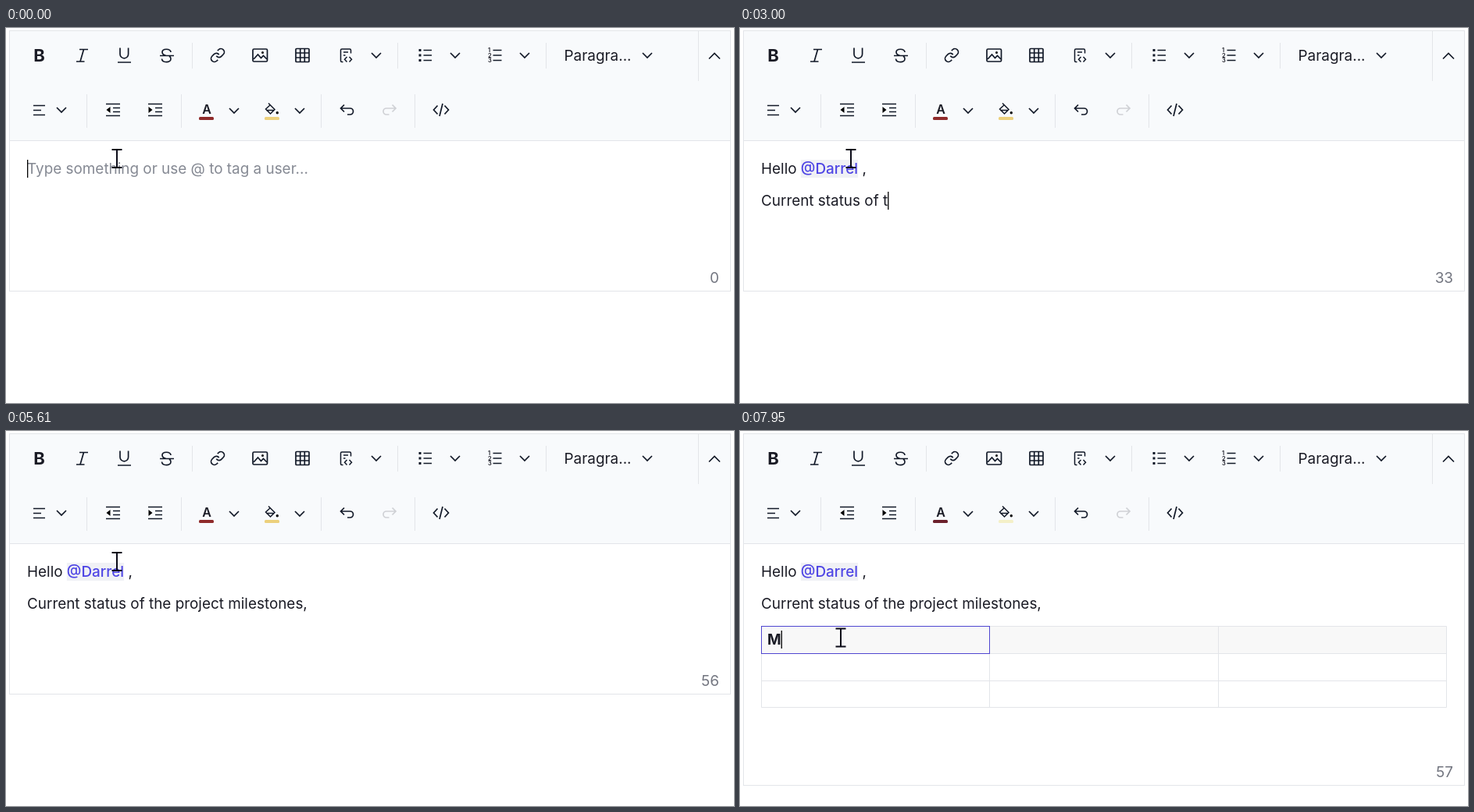
An HTML page that plays this animation: 932 px wide and 481 px high, repeating every 8 s.

```html
<!DOCTYPE html>
<html lang="en">
<head>
<meta charset="utf-8">
<title>Rich text editor</title>
<style>
  html, body { margin: 0; width: 100%; height: 100%; overflow: hidden; background: #fff; }
  svg { display: block; }
  text { font: 400 18.9px Inter, sans-serif; fill: #1a1b25; white-space: pre; }
  .mid { font-weight: 500; }
  .semi { font-weight: 600; }
  .note { font-size: 14.85px; }
  .label { font-size: 16.2px; font-weight: 500; }
  .line { fill: none; stroke: #e3e5e9; }
  .icon { fill: none; stroke: #111827; stroke-width: 1.7; }
  .soft { fill: none; stroke: #6b7280; stroke-width: 1.6; }
  .field { fill: #fff; stroke: #d1d5db; }
  .scroll { fill: #8b8b8b; stroke: #8b8b8b; stroke-linejoin: round; }
  .pop { filter: drop-shadow(0 2px 4px rgba(0, 0, 0, .28)); }
  .modal { filter: drop-shadow(0 6px 8px rgba(0, 0, 0, .2)); }
</style>
</head>
<body>
<svg id="stage" width="932" height="481" viewBox="0 0 932 481"></svg>
<script>
const LOOP = 8000;
const USER = 'Darrel';
const GREETING = 'Hello @';
const SENTENCE = 'Current status of the project milestones,';

const path = (d, cls = 'icon', extra = '') => `<path class="${cls}" d="${d}" ${extra}/>`;
const label = (x, y, s, cls = '', extra = '') => `<text x="${x}" y="${y}" class="${cls}" ${extra}>${s}</text>`;
const box = (x, y, w, h, extra = '') => `<rect x="${x}" y="${y}" width="${w}" height="${h}" ${extra}/>`;
const chevron = (x, y, up, cls) => path(`M${x - 6} ${y + (up ? 3 : -3)}l6 ${up ? -6 : 6}l6 ${up ? 6 : -6}`, cls);

function toolbar() {
  const link = 'M10 13a5 5 0 0 0 7.54.54l3-3a5 5 0 0 0-7.07-7.07l-1.72 1.71M14 11a5 5 0 0 0-7.54-.54l-3 3a5 5 0 0 0 7.07 7.07l1.71-1.71';
  const rules = [238.5, 501.5, 691.5].map(x => `M${x} 19V52`)
    .concat([103.5, 224.5, 403.5, 523.5].map(x => `M${x} 85V128`)).join('');
  const downs = [[474, 35], [575, 35], [664, 35], [821, 35], [71, 105], [292, 106], [376, 106]];
  return box(5, 4, 922, 140, 'fill="#f8fafc"')
    + path('M5 144.5H927M886.5 4V68' + rules, 'line')
    + downs.map(([x, y]) => chevron(x, y)).join('')
    + path('M900 39.5l7-7l7 7')
    + label(35.2, 43, 'B', '', 'style="font-size:22px;font-weight:700"')
    + path('M94 27.5H105M90 43H100.5M99.5 27.5L95 43')
    + path('M146 25.5V33.5a5.3 5.3 0 0 0 10.6 0V25.5M143 44H160')
    + path('M211 31c-.5-5-11-5-11 0c0 2.5 2 3.7 5 4.5M199.5 39.5c.5 5.5 11.5 5.5 11.5 0c0-1.5-.6-2.7-2-3.5M197 35.5H215')
    + path(link, 'icon', 'transform="translate(260.8 24.8) scale(.85)" style="stroke-width:2"')
    + box(316, 27, 18.5, 16, 'class="icon" rx="1.5"')
    + path('M317 40l5.5-6l4 4.5l3-3l4.5 4.5') + '<circle cx="328.5" cy="31.5" r="1.5"/>'
    + box(371, 26.5, 17, 17, 'class="icon" rx="1"')
    + path('M371 32H388M371 38H388M376.7 26.5V43.5M382.3 26.5V43.5')
    + path('M431.5 43.5H430a1.5 1.5 0 0 1-1.5-1.5V28.5a1.5 1.5 0 0 1 1.5-1.5H440a1.5 1.5 0 0 1 1.5 1.5V32.5M432 31H438M432 35H434.5M436.5 37l-3 3.2l3 3.2M439.5 37l3 3.2l-3 3.2', 'icon', 'style="stroke-width:1.5"')
    + path('M528.5 28.5h3M528.5 35h3M528.5 41.5h3', 'icon', 'style="stroke-width:3"')
    + path('M534.5 28.5H545M534.5 35H545M534.5 41.5H545M623.5 28.5H634.5M623.5 35H634.5M623.5 41.5H634.5')
    + [1, 2, 3].map(n => label(617, 24.5 + n * 6.5, n, 'semi', 'style="font-size:7.5px"')).join('')
    + label(714.5, 42, 'Paragra...')
    + path('M35 99.5H50M35 105.5H45M35 111.5H50')
    + path('M128 97.5H146M137 102.5H146M137 107.5H146M128 112.5H146M182 97.5H200M191 102.5H200M191 107.5H200M182 112.5H200')
    + '<path d="M133.5 101v8l-5-4zM182.5 101v8l5-4z"/>'
    + label(251.3, 110, 'A', 'semi', 'style="font-size:16px"')
    + box(247, 114, 19, 4, 'rx="1.5" id="inkBar"')
    + path('M336 96.5l8 8l-5.5 5.5l-6-6l6-5.5M333 105.5H343', 'icon', 'style="stroke-width:1.5"')
    + '<circle cx="347.3" cy="108.7" r="1.7"/>'
    + box(331, 114, 19, 4, 'rx="1.5" id="fillBar"')
    + path('M433 98.5l-4.5 4.5l4.5 4.5M428.5 103H440.5a4 4 0 0 1 0 8H437')
    + path('M494.5 98.5l4.5 4.5l-4.5 4.5M499 103H487a4 4 0 0 0 0 8H490.5', 'icon', 'style="stroke:#cfd1d5"')
    + path('M552.5 99.5l-5 5.5l5 5.5M561.5 99.5l5 5.5l-5 5.5M559 97l-4 16');
}

const blockItem = (y, icon, title, note) =>
  icon + label(124, y + 27, title, 'mid') + label(124, y + 54.4, note, 'note');
const glyph = (y, s) => label(63, y + 42.5, s, '', 'style="font-size:17.5px;fill:#30323d"');

function blockMenu() {
  return `<g id="blocks" class="pop">${box(27, 275, 405, 300, 'fill="#fff"')}
    ${label(43, 302, 'Basic Block', 'mid')}${box(27, 317, 382, 70, 'fill="#e5e6e7"')}
    ${blockItem(317, glyph(317, 'T'), 'Paragraph', 'Writing with paragraphs.')}
    ${blockItem(387, glyph(387, 'H1'), 'Heading 1', 'Use this for a top level heading or title.')}
    ${blockItem(457, glyph(457, 'H2'), 'Heading 2', '')}
    ${path('M414 291l6.5-9.5l6.5 9.5z', 'scroll')}${box(414, 301, 13, 136, 'rx="6" fill="#8b8b8b"')}</g>
    <g id="tableItem" class="pop">${box(27, 275, 405, 113, 'fill="#fff"')}
    ${label(43, 302, 'Basic Block', 'mid')}${box(27, 317, 405, 70, 'fill="#e5e6e7"')}
    ${blockItem(317, path('M64 345.5h16v15h-16zM64 350.5h16M64 355.5h16M72 345.5v15'), 'Table', 'Insert a table.')}</g>`;
}

function userMenu() {
  const people = [USER, 'Camira', 'Rowena', 'Tobin'];
  const tones = ['#a9b8cc', '#d3b7a3', '#b5c6ae', '#c1b3cf'];
  const rows = people.map((name, i) => {
    const y = 197 + i * 73;
    return (i ? '' : box(78, y, 317, 73, 'fill="#e5e6e7"'))
      + `<circle cx="113" cy="${y + 35}" r="23" fill="${tones[i]}"/>
      <path fill="#667085" d="M99 ${y + 52}c2-17 26-17 28 0a22 22 0 0 1-28 0z"/><circle cx="113" cy="${y + 29}" r="8" fill="#667085"/>`
      + label(150, y + 30, name, 'mid') + label(150, y + 52, name.toLowerCase() + '@mail.example', 'note');
  }).join('');
  return `<clipPath id="userClip">${box(78, 195, 336, 265)}</clipPath>
    <g id="users" class="pop">${box(78, 195, 336, 265, 'fill="#fff"')}<g clip-path="url(#userClip)">${rows}</g>
    ${path('M397.5 210l6.5-9.5l6.5 9.5z', 'scroll')}${box(398, 219, 12, 110, 'rx="6" fill="#8b8b8b"')}</g>`;
}

function numberField(id, y, title) {
  return label(262, y - 13.5, title, 'label')
    + box(258.5, y, 347, 41, `rx="5" class="field" id="${id}Field"`)
    + box(270, y + 9, 11.5, 23, `fill="#1a73d8" id="${id}Mark"`)
    + label(270, y + 26.5, '3', '', `id="${id}"`)
    + chevron(545, y + 19.5, false, 'soft') + chevron(585, y + 19.5, true, 'soft');
}

function dialog() {
  return `<g id="dialog"><g class="modal">${box(237, 3, 391, 327, 'rx="8" fill="#fff"')}</g>
    <path d="M237 266H628V322a8 8 0 0 1-8 8H245a8 8 0 0 1-8-8z" fill="#f8f9fc"/>
    ${label(257.5, 37, 'Insert Table', 'semi', 'style="font-size:21.6px"')}
    ${path('M586 18l13.5 13.5M599.5 18l-13.5 13.5', 'soft')}
    ${numberField('cols', 111.5, 'Number of columns')}${numberField('rows', 202.5, 'Number of rows')}
    ${box(432, 277, 77, 42, 'rx="5" fill="#4f46e5"')}${label(443.5, 304, 'Insert', 'semi', 'style="fill:#fff"')}
    ${box(519.5, 277.5, 86, 41, 'rx="5" class="field"')}${label(530.5, 304, 'Cancel', 'semi', 'style="fill:#374151"')}</g>`;
}

function tableTools() {
  const grid = x => path(`M${x - 8} 208h16v16h-16zM${x - 8} 213.3h16M${x - 8} 218.6h16M${x} 208v16`);
  const spots = [129, 190, 270, 350, 430, 510, 590, 670, 750];
  return `<g id="tools"><g class="pop">${box(104, 188, 724, 54, 'rx="5" fill="#fff"')}</g>
    ${box(108, 194, 42, 42, 'rx="4" fill="#e5e7eb" id="toolHover"')}
    ${spots.map((x, i) => grid(x) + (i ? chevron(x + 32, 216) : '')).join('')}</g>`;
}

const stage = document.getElementById('stage');
stage.innerHTML = toolbar()
  + box(4.5, 3.5, 923, 334, 'class="line" id="frame"')
  + label(27, 187, 'Type something or use @ to tag a user...', '', 'id="hint" style="fill:#858993"')
  + box(78, 169, 73, 23, 'fill="#f0f1f5" id="chip"')
  + '<text x="27" y="187" id="line1"><tspan id="hello"></tspan><tspan id="tag" class="mid" style="fill:#4f46e5"></tspan><tspan id="tail"></tspan></text>'
  + label(27, 228, '', '', 'id="line2"') + label(27, 270, '', '', 'id="line3"')
  + `<g id="table">${box(28, 251, 876, 34, 'fill="#f8f8f8" id="head"')}${path('', 'line', 'id="grid"')}
     ${box(27.5, 250.5, 292, 35, 'fill="none" stroke="#4f46d0"')}${label(35, 274, '', '', 'id="cell" style="font-weight:700"')}
     ${box(898, 314, 14, 14, 'fill="#fff" stroke="#9ca3af" id="handle"')}</g>`
  + label(913, 327, '', '', 'id="count" text-anchor="end" style="fill:#737680"')
  + box(0, 0, 1.3, 23, 'id="caret"')
  + userMenu() + blockMenu() + tableTools() + dialog()
  + `<g id="beam">${path('M-6.5-11.5H6.5M0-11.5V11.5M-6.5 11.5H6.5', '', 'fill="none" stroke="#0b0b18" stroke-width="2"')}</g>`
  + '<path id="hand" d="M0 0c2 0 2 1 2 3v6l8 2q2 1 1.5 3l-1.5 8h-10l-6-8q0-3 4-1V3c0-2 0-3 2-3z" fill="#fff" stroke="#111"/>';

const ui = {};
stage.querySelectorAll('[id]').forEach(el => ui[el.id] = el);

const show = (el, on) => { el.style.display = on ? '' : 'none'; };
const write = (el, s) => { if (el.textContent !== s) el.textContent = s; };
const set = (el, attrs) => { for (const k in attrs) el.setAttribute(k, attrs[k]); };
const typed = (t, start, step, max) => Math.max(0, Math.min(max, Math.floor((t - start) / step) + 1));
const during = (t, a, b) => t >= a && t < b;
const fade = (t, a, b) => Math.max(0, Math.min(1, (t - a) / (b - a)));

function caretSpot(t) {
  const after = (id, x) => x + ui[id].getComputedTextLength();
  if (t >= 6600) return { x: after('cell', 35), y: 256 };
  if (t >= 4535) return { x: after('line3', 27), y: 252 };
  if (t >= 1597) return { x: after('line2', 27), y: 210 };
  return { x: after('line1', 27), y: 169 };
}

function render(t) {
  const tagged = t >= 1260;
  const n1 = typed(t, 320, 66.5, GREETING.length);
  const n2 = t < 2383 ? typed(t, 1727, 66.7, 10) : 9 + typed(t, 2383, 66.3, SENTENCE.length - 9);
  const n3 = during(t, 4600, 5610) ? (t < 4940 ? 1 : t < 5010 ? 2 : 3) : 0;
  const inserted = t >= 6600;
  const headed = t >= 7470;
  const done = t >= 7950;

  show(ui.hint, n1 === 0);
  write(ui.hello, tagged ? 'Hello ' : GREETING.slice(0, n1));
  write(ui.tag, tagged ? '@' + USER : '');
  write(ui.tail, t >= 1530 ? ' ,' : tagged ? ' ' : '');
  write(ui.line2, SENTENCE.slice(0, n2));
  write(ui.line3, '/ta'.slice(0, n3));
  write(ui.cell, done ? 'M' : '');

  show(ui.chip, tagged);
  if (tagged) set(ui.chip, {
    x: 27 + ui.hello.getComputedTextLength(), width: ui.tag.getComputedTextLength()
  });

  const base = tagged ? 13 + (t >= 1530) : n1;
  write(ui.count, String(base + n2 + n3 + (t >= 4535) + done));

  const bottom = headed ? 454.5 : inserted ? 419.5 : 337.5;
  set(ui.frame, { height: bottom - 3.5 });
  set(ui.count, { y: bottom - 10.5 });
  set(ui.inkBar, { fill: inserted ? '#6b202b' : '#8f2b2b' });
  set(ui.fillBar, { fill: inserted ? '#f4f0c8' : '#ecd07c' });

  show(ui.table, inserted);
  show(ui.head, headed);
  show(ui.handle, during(t, 7210, 7470));
  const end = headed ? 354.5 : 320.5;
  set(ui.grid, { d: `M27.5 250.5H904.5V${end}H27.5zM27.5 285.5H904.5M27.5 320.5H904.5M319.5 250.5V${end}M612.5 250.5V${end}` });

  set(ui.caret, caretSpot(t));
  show(ui.caret, !during(t, 5610, 6600) && !during(t, 7210, 7880));

  show(ui.users, during(t, 780, 1390));
  ui.users.style.opacity = t < 1260 ? fade(t, 715, 910) : 1 - fade(t, 1260, 1390);
  show(ui.blocks, during(t, 4670, 5210));
  ui.blocks.style.opacity = fade(t, 4600, 4740);
  show(ui.tableItem, during(t, 5210, 5610));

  show(ui.dialog, during(t, 5680, 6600));
  const focus = t < 5940 ? 'cols' : t < 6330 ? 'rows' : '';
  write(ui.rows, t < 6130 ? '3' : '2');
  for (const id of ['cols', 'rows']) {
    const on = id === focus;
    const marked = on && t < 6130;
    set(ui[id + 'Field'], { style: on ? 'stroke:#4f46e5;stroke-width:2' : '' });
    show(ui[id + 'Mark'], marked);
    ui[id].style.fill = marked ? '#fff' : '#1f2440';
  }

  show(ui.tools, during(t, 6940, 7470));
  show(ui.toolHover, t >= 7210);
  const pointing = during(t, 7210, 7470);
  show(ui.beam, !pointing);
  show(ui.hand, pointing);
  const [bx, by] = headed ? [129, 265] : t >= 6940 ? [146, 276] : [142, 167.5];
  set(ui.beam, { transform: `translate(${bx} ${by})` });
  set(ui.hand, { transform: 'translate(129 212)' });
}

function tick() {
  render(performance.now() % LOOP);
  requestAnimationFrame(tick);
}
tick();
</script>
</body>
</html>
```
